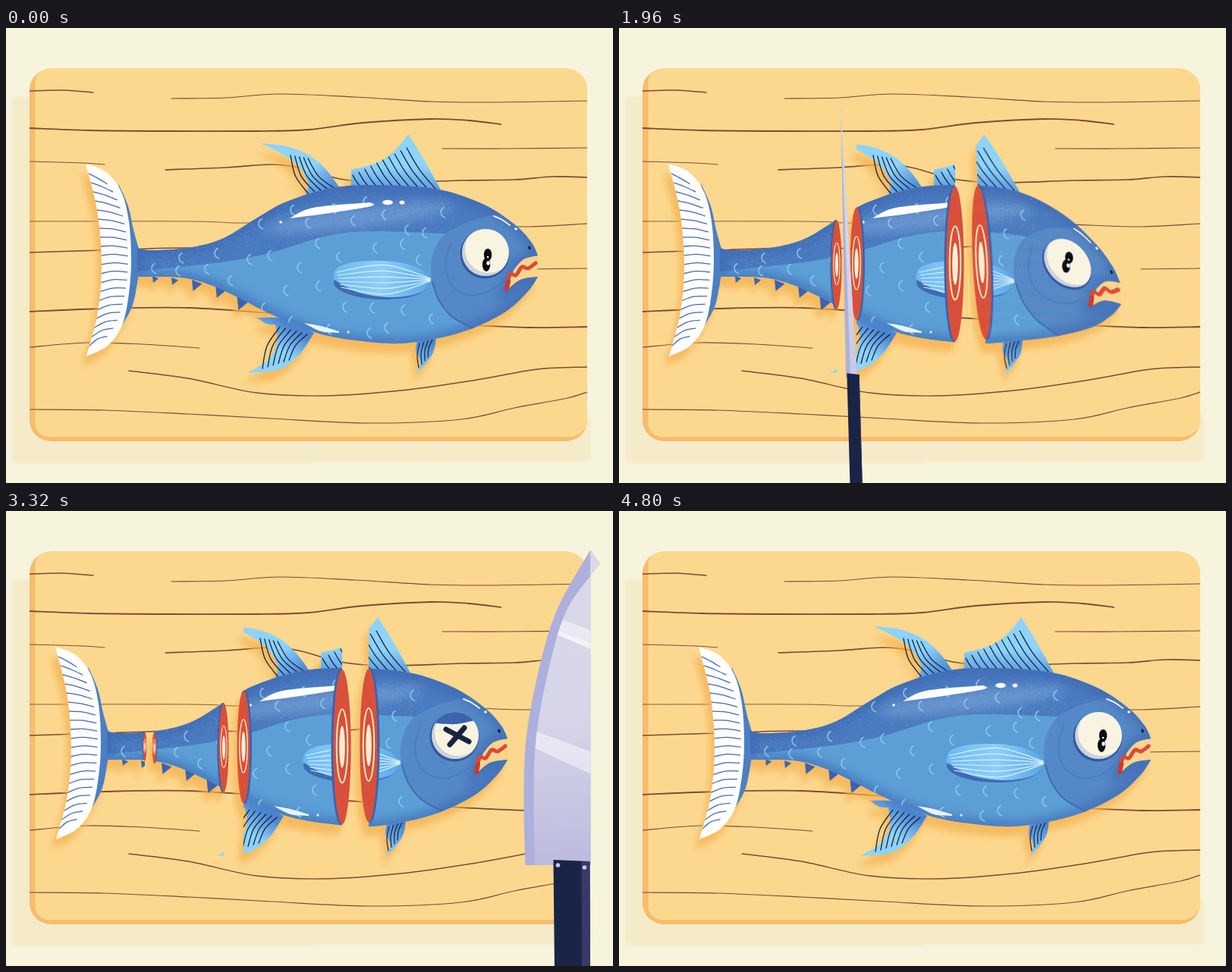
Write an HTML page with a canvas that moves like this. It is 800 px wide and 600 px high and loops after 4.84 s.

```html
<!DOCTYPE html>
<html lang="en">
<head>
<meta charset="utf-8">
<title>Fish on a board</title>
<style>
html, body { margin: 0; width: 100%; height: 100%; overflow: hidden; background: #f7f4de; }
canvas { display: block; width: 800px; height: 600px; }
</style>
</head>
<body>
<canvas id="stage" width="800" height="600"></canvas>
<script>
const LOOP = 4840, NAVY = '#18233f', BACK = '#4a7abf', DEEP = '#3c63ae', CREAM = '#f8f4e1';
const stage = document.getElementById('stage').getContext('2d');
const clamp = (v, a = 0, b = 1) => Math.min(b, Math.max(a, v));
const lerp = (a, b, u) => a + (b - a) * u;
const smooth = u => { u = clamp(u); return u * u * (3 - 2 * u); };

let seed = 7;
const rand = () => (seed = (seed * 16807) % 2147483647) / 2147483647;

function layer() {
  const c = document.createElement('canvas');
  c.width = 800; c.height = 600;
  return c.getContext('2d');
}

// Eased values between rows of [time, ...values]
function track(t, rows) {
  let i = rows.findIndex(r => r[0] > t);
  if (i < 0) return rows[rows.length - 1].slice(1);
  if (i === 0) return rows[0].slice(1);
  const a = rows[i - 1], b = rows[i], u = smooth((t - a[0]) / (b[0] - a[0]));
  return a.slice(1).map((v, k) => lerp(v, b[k + 1], u));
}

// Smooth curve through flat x,y points
function spline(path, c, join) {
  const n = c.length / 2;
  const at = (i, k) => c[2 * clamp(i, 0, n - 1) + k];
  path[join ? 'lineTo' : 'moveTo'](c[0], c[1]);
  for (let i = 0; i < n - 1; i++) {
    const h = k => [at(i, k) + (at(i + 1, k) - at(i - 1, k)) / 6,
                    at(i + 1, k) - (at(i + 2, k) - at(i, k)) / 6];
    const [x1, x2] = h(0), [y1, y2] = h(1);
    path.bezierCurveTo(x1, y1, x2, y2, at(i + 1, 0), at(i + 1, 1));
  }
}

// Closed shape made of smooth runs that meet at corners
function shape(...runs) {
  const p = new Path2D();
  runs.forEach((r, i) => spline(p, r, i > 0));
  p.closePath();
  return p;
}

function line(g, color, width, ...pts) {
  const p = new Path2D();
  spline(p, pts);
  g.strokeStyle = color; g.lineWidth = width; g.lineCap = 'round';
  g.stroke(p);
}

function fill(g, color, path) { g.fillStyle = color; g.fill(path); }

function oval(g, color, x, y, rx, ry = rx, turn = 0) {
  g.beginPath();
  g.ellipse(x, y, rx, ry, turn, 0, 7);
  g.fillStyle = color;
  g.fill();
}

function gradient(g, x1, y1, x2, y2, ...colors) {
  const gr = g.createLinearGradient(x1, y1, x2, y2);
  colors.forEach((c, i) => gr.addColorStop(i / (colors.length - 1), c));
  return gr;
}

// n bowed lines from segment a to segment b
function rays(g, color, width, n, a, b, bow) {
  for (let i = 0; i < n; i++) {
    const u = i / (n - 1);
    const x1 = lerp(a[0], a[2], u), y1 = lerp(a[1], a[3], u);
    const x2 = lerp(b[0], b[2], u), y2 = lerp(b[1], b[3], u);
    const k = typeof bow === 'function' ? bow(u) : bow;
    line(g, color, width, x1, y1, (x1 + x2) / 2 - (y1 - y2) * k, (y1 + y2) / 2 + (x1 - x2) * k, x2, y2);
  }
}

function clipped(g, path, draw) {
  g.save(); g.clip(path); draw(); g.restore();
}

function drawBoard(g) {
  g.fillStyle = '#f7f4de';
  g.fillRect(0, 0, 800, 600);
  g.fillStyle = '#f5ebc9';
  g.filter = 'blur(1.5px)';
  g.beginPath(); g.roundRect(8, 90, 400, 484, 8); g.roundRect(360, 510, 411, 62, 6); g.fill();
  g.filter = 'none';
  const outer = new Path2D(), top = new Path2D();
  outer.roundRect(31, 53.5, 735, 491.5, 28);
  top.roundRect(38.5, 53, 728, 486, [18, 28, 24, 18]);
  fill(g, '#f5bd6c', outer);
  clipped(g, outer, () => {
    fill(g, '#fcd88f', top);
    const grain = (w, ...pts) => line(g, '#7b4c34', w, ...pts);
    grain(1.4, 31, 83, 75, 82, 115, 85);
    grain(1.1, 218, 93, 290, 92, 360, 87, 460, 91, 560, 97, 640, 98, 766, 96);
    grain(1.8, 31, 132, 110, 135, 220, 136, 330, 136, 400, 134, 470, 125, 560, 120, 610, 122, 652, 127);
    grain(1.2, 575, 159, 660, 159, 766, 158);
    grain(1, 31, 176, 100, 178, 130, 180);
    grain(1.7, 210, 187, 290, 184, 350, 180, 390, 185, 440, 199, 500, 204, 600, 201, 670, 200, 720, 196, 766, 197);
    grain(.9, 31, 255, 240, 255, 300, 257, 345, 257, 366, 260);
    grain(1.1, 557, 257, 620, 260, 690, 262, 766, 258);
    grain(1.5, 31, 296, 130, 293, 230, 290, 390, 291, 480, 287, 575, 278);
    grain(1.2, 688, 318, 766, 317);
    grain(1.8, 31, 374, 130, 370, 240, 369, 350, 376, 480, 384, 600, 391, 690, 395, 766, 394);
    grain(1.1, 31, 421, 105, 415, 180, 417, 255, 422);
    grain(1.4, 162, 452, 240, 462, 330, 481, 420, 485, 520, 478, 620, 464, 700, 450, 766, 447);
    grain(1.2, 31, 503, 130, 504, 240, 509, 350, 515, 480, 521, 600, 516, 670, 501, 740, 488, 766, 480);
  });
}

function drawTail(g) {
  fill(g, '#4b7fc4', shape([108, 205, 121, 235, 128, 266, 135, 291], [135, 291, 137, 310, 134, 330],
    [134, 330, 127, 365, 113, 392], [113, 392, 122, 300, 108, 205]));
  const fin = shape([65, 179, 92, 190, 112, 216, 122, 255, 125, 305, 122, 350, 113, 392, 94, 419, 66, 433],
    [66, 433, 81, 375, 86, 310, 80, 240, 65, 179]);
  fill(g, '#fff', fin);
  clipped(g, fin, () => {
    for (let i = 0; i < 20; i++) {
      const y = 192 + i * 12, q = (y - 306) / 127, r = 1 - q * q;
      const left = 65 + 20 * r, right = 65 + 59 * r ** .4, len = (right - left) * .9;
      line(g, '#4468b4', 1.3, left, y, left + len * .5, y - 9 * q - 2, left + len, y - 15 * q);
    }
  });
}

function drawFins(g) {
  fill(g, gradient(g, 330, 160, 375, 220, '#8dd3fc', '#8dd3fc', '#4f8ed6'),
    shape([295, 152, 330, 156, 360, 168, 383, 188, 402, 214], [402, 220, 353, 224],
      [353, 224, 358, 205, 345, 182, 322, 165, 295, 152]));
  rays(g, NAVY, 1.3, 5, [335, 168, 358, 172], [358, 218, 394, 212], -.1);
  fill(g, gradient(g, 465, 150, 465, 216, '#8dd3fc', '#8dd3fc', '#5596dc'),
    shape([415, 213, 415, 187], [415, 187, 450, 177, 473, 161, 490, 140], [490, 140, 510, 172, 535, 217]));
  rays(g, NAVY, 1.3, 10, [417, 194, 488, 158], [428, 210, 526, 212], -.04);
  fill(g, gradient(g, 335, 395, 300, 450, '#4b85cf', '#8dd3fc', '#8dd3fc'),
    shape([291, 382, 330, 384, 366, 402], [366, 402, 347, 430, 320, 450, 278, 455],
      [278, 455, 306, 437, 317, 414, 315, 391], [315, 391, 303, 390, 291, 382]));
  rays(g, NAVY, 1.3, 6, [298, 449, 333, 438], [321, 394, 357, 404], .1);
  fill(g, gradient(g, 514, 410, 505, 455, '#4880ca', '#8dd3fc'),
    shape([502, 412, 527, 407], [527, 407, 522, 430, 501, 457], [501, 457, 506, 440, 500, 426, 502, 412]));
  rays(g, NAVY, 1.2, 4, [504, 448, 516, 434], [505, 416, 522, 411], .08);
  for (const [x, y, s] of [[153, 327, 9], [178, 329, 10], [205, 332, 15], [236, 338, 18], [264, 349, 23]])
    fill(g, DEEP, shape([x, y], [x + s * .9, y + s * .35], [x + s * .1, y + s]));
}

function drawBody(g) {
  const body = shape(
    [133, 290, 150, 293, 200, 290, 245, 278, 290, 251, 330, 229, 390, 211, 450, 207, 530, 213, 590, 233, 630, 259, 652, 282, 661, 300],
    [661, 300, 642, 305, 629, 319], [629, 319, 619, 347], [619, 347, 638, 332, 661, 328],
    [661, 328, 648, 347, 620, 373, 575, 396, 530, 409, 480, 416, 430, 413, 380, 405, 340, 391, 300, 373, 265, 355, 230, 339, 190, 329, 133, 328]);
  fill(g, '#fbd48d', shape([661, 300], [620, 310], [617, 347], [640, 342], [660, 328]));
  fill(g, '#5c9fd7', body);
  clipped(g, body, () => {
    fill(g, BACK, shape([120, 322, 180, 316, 250, 308, 310, 296, 380, 275, 440, 268, 537, 271], [600, 271], [640, 190], [120, 190]));
    fill(g, '#5588c6', shape([570, 255, 537, 273, 521, 305, 524, 345, 545, 378, 573, 396], [700, 420], [700, 220]));
    g.filter = 'blur(7px)';
    g.globalAlpha = .75;
    g.strokeStyle = '#3d64b1'; g.lineWidth = 13; g.stroke(body);
    g.globalAlpha = .5;
    oval(g, '#86b0e0', 425, 250, 125, 13, -.12);
    g.filter = 'none';
    g.globalAlpha = .4;
    for (let i = 0; i < 2200; i++) {
      const x = 140 + rand() * 410, spread = rand() + rand() + rand() - 1.5;
      const ridge = 212 + Math.max(0, 390 - x) ** 1.6 / 95;
      const light = i % 2;
      g.fillStyle = light ? '#8db5e3' : '#3c62ae';
      g.fillRect(x, ridge + (light ? 38 : 12) + spread * 26, 1, 1);
    }
    g.globalAlpha = 1;
    line(g, '#3f6cb4', 2, 522, 335, 530, 358, 547, 380, 575, 396);
    line(g, '#497bbf', 1.6, 546, 283, 539, 312, 548, 340, 570, 352, 592, 349, 612, 337);
    drawScales(g);
  });
  line(g, '#d94b34', 5, 620, 344, 624, 325, 632, 326, 640, 315, 648, 317, 658, 310);
  line(g, '#c93b2c', 6, 620, 344, 622, 334);
  oval(g, NAVY, 650, 290, 1.8, 2.4, -.4);
}

function drawScales(g) {
  const spots = [339, 240, 393, 238, 435, 229, 297, 258, 359, 257, 419, 254, 460, 246, 537, 243, 513, 270,
    239, 297, 309, 300, 372, 284, 448, 290, 484, 285, 192, 303, 156, 317, 188, 320, 226, 318, 257, 333,
    282, 305, 348, 316, 400, 302, 505, 306, 490, 266, 330, 346, 373, 340, 408, 368, 444, 369, 483, 349,
    485, 372, 301, 369, 337, 387, 387, 397, 440, 402, 463, 395, 522, 383];
  g.strokeStyle = '#8fc8f1'; g.lineWidth = 1.5;
  for (let i = 0; i < spots.length; i += 2) {
    g.beginPath();
    g.arc(spots[i] + 3, spots[i + 1], 7, 1.8, 4.3);
    g.stroke();
  }
}

function drawDetails(g) {
  oval(g, '#3e6bb3', 454, 337, 62, 21, .03);
  const fin = shape([391, 331, 397, 316, 425, 308, 470, 308, 505, 317, 521, 331],
    [521, 331, 508, 348, 470, 355, 425, 349, 391, 331]);
  fill(g, gradient(g, 391, 330, 521, 330, '#6cbaf1', '#8fcff8', '#55a6e8'), fin);
  rays(g, '#d9f0fd', 1.2, 6, [396, 322, 402, 342], [519, 330, 519, 334], u => (u - .5) * -.22);
  fill(g, '#fff', shape([334, 251, 365, 237, 440, 230], [440, 230, 441, 235, 380, 245, 334, 251]));
  oval(g, '#fff', 463, 230, 7, 3.3);
  oval(g, '#fff', 482, 230, 3.4, 2.6);
  oval(g, '#fff', 322, 256, 1.8);
  line(g, '#fff', 1.8, 603, 248, 614, 253, 624, 260);
  oval(g, '#fff', 632, 265, 1.8);
  fill(g, '#e8f3fc', shape([353, 389, 375, 393, 399, 400], [399, 402, 375, 400, 353, 389]));
  oval(g, '#d5e8f8', 411, 401, 1.7);
}

function drawEye(g, { lid, px, py, dead, tilt }) {
  const x = 592, y = 296, ball = new Path2D();
  oval(g, '#33589f', x - 1, y + 2, 32.5);
  ball.arc(x, y, 31, 0, 7);
  fill(g, CREAM, ball);
  clipped(g, ball, () => {
    g.strokeStyle = 'rgba(120,150,205,.35)'; g.lineWidth = 8;
    g.beginPath(); g.arc(x + 4, y - 4, 35, .9, 3.6); g.stroke();
    if (dead) {
      line(g, NAVY, 7, x - 12, y - 8, x + 18, y + 8);
      line(g, NAVY, 7, x + 12, y - 10, x - 7, y + 12);
    } else {
      g.save();
      g.translate(x + px, y + py); g.rotate(tilt);
      oval(g, '#0b0b10', 1, -7, 5.2, 8);
      oval(g, '#0b0b10', -1, 6, 5.2, 9);
      oval(g, '#fff', 1.5, 4, 2.2, 2.8);
      oval(g, '#fff', 1, -4, 1.3);
      g.restore();
    }
    if (lid > 0) {
      const edge = y - 32 + 64 * lid;
      fill(g, DEEP, shape([x - 34, y - 34], [x + 34, y - 34], [x + 34, edge - 4, x, edge + 3, x - 34, edge + 1]));
    }
  });
}

// Gap between two slices: left face, right face, as x, y, rx, ry
const CUTS = [
  { at: 1190, left: [443, 311, 12.5, 103], right: [478, 309, 12.5, 102] },
  { at: 1890, left: [287, 312, 7, 59], right: [313, 311, 9, 75] },
  { at: 2490, left: [183, 310.5, 2.5, 19], right: [195.5, 312, 3, 21] }
];

function drawFace(g, [x, y, rx, ry], side) {
  oval(g, DEEP, x + side * Math.min(2, rx * .25), y, rx, ry);
  oval(g, '#d9503a', x, y, rx * .93, ry * .99);
  g.strokeStyle = '#f9e6c4'; g.lineWidth = Math.max(.7, rx * .16);
  g.beginPath(); g.ellipse(x, y - 1, rx * .58, ry * .47, 0, 0, 7); g.stroke();
  oval(g, '#fbeed2', x, y, rx * .3, ry * .27);
}

const board = layer(), art = layer(), fish = layer(), lit = layer();
drawBoard(board);
drawTail(art); drawFins(art); drawBody(art); drawDetails(art);

function composeFish(t) {
  fish.clearRect(0, 0, 800, 600);
  fish.drawImage(art.canvas, 0, 0);
  const [px, py, tilt] = track(t, [[0, 2, 10, 0], [60, 2, 10, 0], [260, 14, -2, .05], [1120, 10, -2, .05],
    [1220, -4, 9, .1], [1400, -4, 6, .1], [1700, 0, -1, .2], [2480, 0, -1, .2],
    [3900, -1, 0, 0], [4600, -1, 0, 0], [4720, 5, 7, 0], [4800, 5, 7, 0], [4840, 2, 10, 0]]);
  const [lid] = track(t, [[0, 0], [1170, 0], [1230, .5], [1320, .48], [1500, 0], [2440, 0], [2490, .9],
    [2600, .22], [3700, .22], [3701, 0], [4500, 0], [4600, 1], [4740, 0]]);
  drawEye(fish, { lid, px, py, tilt, dead: t > 2490 && t < 3700 });
  for (const { at, left, right } of CUTS) {
    if (t < at || t > 3700) continue;
    fish.clearRect(left[0], 0, right[0] - left[0], 600);
    drawFace(fish, left, -1);
    drawFace(fish, right, 1);
  }
  lit.clearRect(0, 0, 800, 600);
  lit.save();
  lit.shadowColor = 'rgba(244,178,80,.75)';
  lit.shadowBlur = 9; lit.shadowOffsetX = -6; lit.shadowOffsetY = 13;
  lit.drawImage(fish.canvas, 0, 0);
  lit.restore();
}

// Bends the fish column by column: tail curls and shrinks, head droops
function drawBent(head, tail, dx) {
  const step = 4;
  const map = x => {
    if (x >= 460) return { x, y: .0011 * head * Math.max(0, x - 480) ** 2, tall: 1, lean: .05 * head };
    const u = clamp((443 - x) / 308);
    return {
      x: x + 38 * tail * u ** 1.2, y: -14 * tail * smooth((u - .4) / .4),
      tall: 1 - .13 * tail * Math.min(1, u * 2), lean: .1 * tail * u
    };
  };
  for (let x = 48; x < 684; x += step) {
    const a = map(x), b = x < 460 && x + step >= 460 ? { ...a, x: a.x + step } : map(x + step);
    stage.setTransform((b.x - a.x) / step, (b.y - a.y) / step, a.lean, a.tall,
      a.x - a.lean * 311 + dx, 311 * (1 - a.tall) + a.y);
    stage.drawImage(lit.canvas, x, 0, step + .4, 600, 0, 0, step + .4, 600);
  }
  stage.resetTransform();
}

function drawSwept(edge) {
  for (const [from, to, left, right] of [[460, 700, 466, 661], [299, 460, 304, 455], [189, 299, 193, 293], [40, 189, 65, 185]]) {
    const push = Math.min(0, edge - right);
    stage.drawImage(lit.canvas, from, 0, to - from, 600, from + push, 0, to - from, 600);
    edge = left + push;
  }
}

function drawKnife(g, x, y, size, flat) {
  const mix = (edgeOn, wide) => lerp(edgeOn, wide, flat);
  const rows = [[25, -411], [-20, -330], [-45, -245], [-60, -160], [-63, -80], [-61, 5]];
  const edge = inset => rows.flatMap(([px, py], i) =>
    [mix(-11 + .0194 * py + inset * .55 * i / 5, px + inset), py + (i ? 0 : inset * 1.4)]);
  g.save();
  g.translate(x, y); g.scale(size, size);
  const back = [[mix(6, 25), 5], [mix(-19, 25), -411]];
  fill(g, '#adb0dc', shape(edge(0), ...back));
  const blade = shape(edge(13), ...back);
  fill(g, gradient(g, 0, -400, mix(0, 20), 10, '#d9d8e8', '#d7d6e8', mix(0, 1) > .5 ? '#bbbade' : '#c9c8e6'), blade);
  if (flat > .4) clipped(g, blade, () => {
    for (const [sy, h] of [[-325, 26], [-165, 30], [-308, 6]]) {
      g.fillStyle = 'rgba(255,255,255,.45)';
      g.beginPath();
      g.moveTo(-70, sy - 15); g.lineTo(30, sy + 22); g.lineTo(30, sy + 22 + h); g.lineTo(-70, sy - 15 + h * .7);
      g.fill();
    }
  });
  const w = mix(9.5, 24);
  fill(g, '#1a2446', shape([-w, -2], [w, 0], [w + mix(8, 1), 280], [-w + mix(8, 3), 280]));
  fill(g, '#3b3768', shape([w - 10 * flat - 1, 0], [w, 0], [w + mix(8, 1), 280], [w - 10 * flat + mix(7, 0), 280]));
  if (flat > .6) {
    oval(g, '#c9c9e4', -18, 5, 2.8);
    oval(g, '#c9c9e4', 17, 8, 2.8);
  }
  g.restore();
}

const KNIFE = [
  [40, 880, 460, 1, 1], [400, 740, 460, 1, 1], [600, 740, 460, 1, 1],
  [900, 530, 450, 1.2, 0], [1090, 478, 450, 1.22, 0], [1190, 475, 434, .78, 0], [1320, 475, 434, .78, 0],
  [1580, 345, 455, 1.15, 0], [1790, 312, 455, 1.06, 0], [1890, 308.5, 457, .86, 0], [2020, 308.5, 457, .86, 0],
  [2220, 230, 452, 1.06, 0], [2390, 203, 450, 1.12, 0], [2490, 198, 440, .8, 0], [2600, 198, 440, .8, 0],
  [2800, 164, 449, 1.1, 0], [2850, 160, 449, 1.12, 0], [3160, 735, 460, 1.04, 1], [3240, 748, 460, 1, 1],
  [3310, 748, 462, 1, 1], [3640, -40, 465, 1, 1]
];

function drawFish(t, knifeX) {
  composeFish(t);
  if (t >= 3960) {
    const [s] = track(t, [[3940, .2], [4150, 1.9], [4320, .97], [4400, 1]]);
    stage.save();
    stage.globalAlpha = lerp(.08, 1, clamp((t - 3960) / 120));
    stage.translate(406, 314); stage.scale(s, s); stage.translate(-366, -314);
    stage.drawImage(lit.canvas, 0, 0);
    stage.restore();
    return;
  }
  if (t > 3240) return drawSwept(knifeX - 58);
  const [dx] = track(t, [[20, 40], [280, -41], [560, 0]]);
  const [head] = track(t, [[1170, 0], [1230, 1], [1280, .82], [1480, 0], [1860, 0], [1930, 1.02], [1970, 1], [2140, 0],
    [2480, 0], [2540, 1], [2720, 0]]);
  const [tail] = track(t, [[1170, 0], [1240, 1.05], [1280, 1], [1460, -.15], [1600, 0], [1960, 0], [2050, -.4], [2200, 0]]);
  if (head || tail) drawBent(head, tail, dx);
  else stage.drawImage(lit.canvas, dx, 0);
}

function frame(now) {
  const t = Math.max(0, now - start) % LOOP;
  const knife = track(t, KNIFE);
  stage.drawImage(board.canvas, 0, 0);
  if (t < 3640 || t >= 3960) drawFish(t, knife[0]);
  if (t > 40 && t < 3640) drawKnife(stage, ...knife);
  requestAnimationFrame(frame);
}
const start = performance.now();
frame(start);
</script>
</body>
</html>
```
